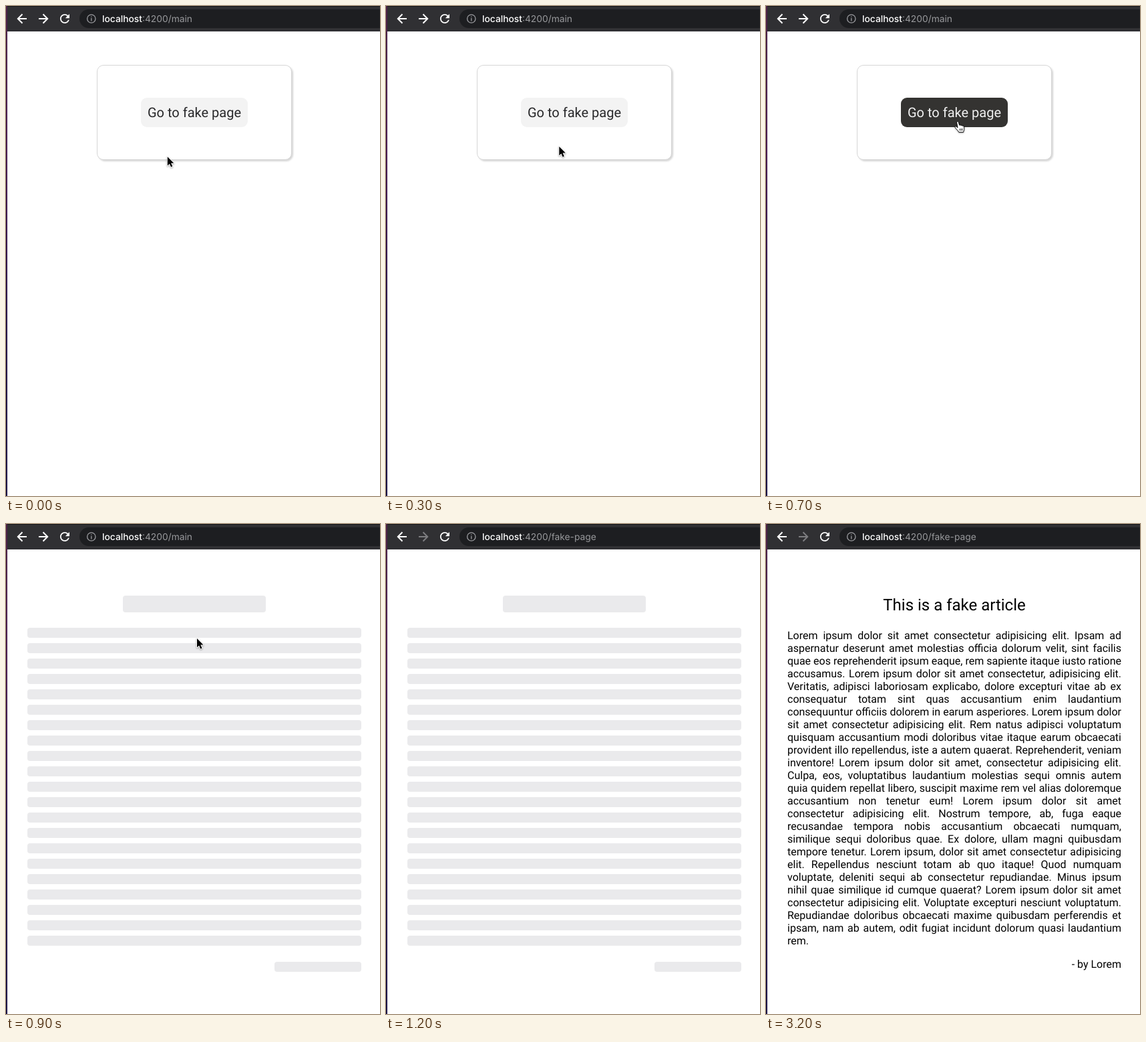
Animation of 560x732 px, one loop 3500 ms. Source, as an HTML page:

```html
<!DOCTYPE html>
<html lang="en">
<head>
<meta charset="utf-8">
<title>Skeleton loading</title>
<style>
  html, body { margin: 0; width: 100%; height: 100%; overflow: hidden; background: #fff; }
  svg { position: absolute; left: 0; top: 0; }
  svg, #article { font-family: Roboto, sans-serif; text-rendering: geometricPrecision; }
  #article { position: absolute; left: 32px; top: 0; width: 500px; color: #000; font-size: 16px; line-height: 19px; }
  #article > * { position: absolute; left: 0; width: 500px; margin: 0; font-weight: 400; }
  h1 { top: 107px; font-size: 24px; line-height: 28px; text-align: center; }
  /* tighter spaces keep every line on one row; justification widens them again */
  #body { top: 157px; white-space: pre-line; text-align: justify; text-align-last: justify; word-spacing: -1px; }
  #author { top: 648px; text-align: right; }
  .url { font: 500 13.8px Inter, sans-serif; }
  .icon { fill: none; stroke: #fff; stroke-width: 2; }
  #card { filter: drop-shadow(2px 2px 1px rgba(0, 0, 0, .16)); }
  #pointer { filter: drop-shadow(0 1px 1px rgba(0, 0, 0, .35)); }
</style>
</head>
<body>
<svg width="560" height="732" viewBox="0 0 560 732">
  <defs>
    <linearGradient id="desktop" x1="0" y1="0" x2="0" y2="1">
      <stop offset="0" stop-color="#4b2145"/>
      <stop offset=".3" stop-color="#481a50"/>
      <stop offset=".65" stop-color="#241048"/>
      <stop offset="1" stop-color="#1b0d45"/>
    </linearGradient>
  </defs>
  <rect width="560" height="732" fill="#fff"/>
  <rect width="2" height="732" fill="url(#desktop)"/>

  <rect x="2" width="558" height="38" fill="#303033"/>
  <rect x="2" width="558" height="1" fill="#151517"/>
  <rect x="110" y="5" width="480" height="28" rx="14" fill="#1d1e21"/>
  <path class="icon" d="M31 19H18M24.5 12.3L17.8 19L24.5 25.7"/>
  <path class="icon" id="forward" d="M49 19H62M55.5 12.3L62.2 19L55.5 25.7"/>
  <path fill="#fff" transform="translate(77.5 8.5) scale(.875)" d="M17.65 6.35C16.2 4.9 14.21 4 12 4c-4.42 0-7.99 3.58-7.99 8s3.57 8 7.99 8c3.73 0 6.84-2.55 7.73-6h-2.08c-.82 2.33-3.04 4-5.65 4-3.31 0-6-2.69-6-6s2.69-6 6-6c1.66 0 3.14.69 4.22 1.78L13 11h7V4z"/>
  <g fill="none" stroke="#9b9ca0" stroke-width="1.3">
    <circle cx="127.8" cy="19" r="6.2"/>
    <path d="M127.8 18V22.5M127.8 15.4V16.8"/>
  </g>
  <text class="url" x="144" y="24" fill="#fff">localhost<tspan id="path" fill="#98999c" font-weight="400"></tspan></text>

  <g id="card">
    <rect x="136.5" y="88.5" width="291" height="141" rx="9.5" fill="#fff" stroke="#d6d6d6"/>
  </g>
  <g id="button">
    <rect id="buttonBox" x="202" y="137" width="160" height="44" rx="9"/>
    <text id="buttonText" x="282" y="166" font-size="20" text-anchor="middle">Go to fake page</text>
  </g>

  <g id="skeleton" fill="#eaeaec"></g>

  <g id="pointer">
    <path id="arrow" d="M0 0V13.3L3.1 10.5L5.3 15.4L7.5 14.4L5.3 9.6H9.5Z" fill="#000" stroke="#fff" stroke-width="1.8" stroke-linejoin="round" paint-order="stroke"/>
    <g id="hand" transform="translate(-4 1)" stroke="#000" stroke-width=".9" stroke-linejoin="round">
      <path fill="#fff" d="M3.6 2C3.4 .2 5.8 0 6.3 1.6L7.6 6.2C8.3 5.4 9.6 5.6 9.9 6.6C10.7 5.9 11.9 6.2 12.1 7.2C13 6.7 14.1 7.2 14.3 8.2L14.8 11C15.1 13.3 13.8 14.5 13.6 16.6H6.8C6 14.4 3.2 12.4 1.3 9.8C.3 8.2 1.8 7.2 3.2 8.3L5 9.8Z"/>
      <path fill="none" stroke-width=".8" d="M8.2 11.2V14.3M10.2 11V14.3M12.1 11V14.3"/>
    </g>
  </g>
</svg>

<div id="article">
  <h1>This is a fake article</h1>
  <p id="body">Lorem ipsum dolor sit amet consectetur adipisicing elit. Ipsam ad
aspernatur deserunt amet molestias officia dolorum velit, sint facilis
quae eos reprehenderit ipsum eaque, rem sapiente itaque iusto ratione
accusamus. Lorem ipsum dolor sit amet consectetur, adipisicing elit.
Veritatis, adipisci laboriosam explicabo, dolore excepturi vitae ab ex
consequatur totam sint quas accusantium enim laudantium
consequuntur officiis dolorem in earum asperiores. Lorem ipsum dolor
sit amet consectetur adipisicing elit. Rem natus adipisci voluptatum
quisquam accusantium modi doloribus vitae itaque earum obcaecati
provident illo repellendus, iste a autem quaerat. Reprehenderit, veniam
inventore! Lorem ipsum dolor sit amet, consectetur adipisicing elit.
Culpa, eos, voluptatibus laudantium molestias sequi omnis autem
quia quidem repellat libero, suscipit maxime rem vel alias doloremque
accusantium non tenetur eum! Lorem ipsum dolor sit amet
consectetur adipisicing elit. Nostrum tempore, ab, fuga eaque
recusandae tempora nobis accusantium obcaecati numquam,
similique sequi doloribus quae. Ex dolore, ullam magni quibusdam
tempore tenetur. Lorem ipsum, dolor sit amet consectetur adipisicing
elit. Repellendus nesciunt totam ab quo itaque! Quod numquam
voluptate, deleniti sequi ab consectetur repudiandae. Minus ipsum
nihil quae similique id cumque quaerat? Lorem ipsum dolor sit amet
consectetur adipisicing elit. Voluptate excepturi nesciunt voluptatum.
Repudiandae doloribus obcaecati maxime quibusdam perferendis et
ipsam, nam ab autem, odit fugiat incidunt dolorum quasi laudantium
rem.</p>
  <p id="author">- by Lorem</p>
</div>

<script>
  const LOOP = 3500, STEP = 100;
  const byId = id => document.getElementById(id);
  const show = (id, visible) => { byId(id).style.display = visible ? '' : 'none'; };
  const blend = (from, to, k) => `rgb(${from.map((v, i) => Math.round(v + (to[i] - v) * k))})`;

  const LIGHT = [243, 243, 243], DARK = [52, 51, 49];
  const TEXT = [40, 40, 42], TEXT_HOVER = [240, 240, 240];

  // [start time, x, y, hover amount of the button]
  const pointerKeys = [
    [0, 241.8, 225.2, 0],
    [100, 242.2, 225.2, 0],
    [300, 259.3, 210, 0],
    [400, 273, 192, 0],
    [500, 282, 177, .25],
    [600, 286, 171, .75],
    [700, 286, 171, 1]
  ];

  const bar = (x, y, width, height) =>
    `<rect x="${x}" y="${y}" width="${width}" height="${height}" rx="4"/>`;
  byId('skeleton').innerHTML = bar(175, 107, 214, 25) + bar(402, 654, 130, 15) +
    Array.from({ length: 21 }, (_, i) => bar(32, 155 + 23 * i, 500, 15)).join('');

  function render(time) {
    const t = Math.floor(time % LOOP / STEP) * STEP;
    const onMain = t < 900, navigated = t >= 1000, loaded = t >= 2900;
    const [, x, y, hover] = pointerKeys.filter(key => key[0] <= t).pop();
    const overButton = onMain && hover > 0;

    show('card', onMain);
    show('button', onMain);
    show('skeleton', !onMain && !loaded);
    show('article', loaded);
    show('pointer', t < 1200);
    show('arrow', !overButton);
    show('hand', overButton);

    byId('path').textContent = navigated ? ':4200/fake-page' : ':4200/main';
    byId('forward').style.stroke = navigated ? '#7d7d80' : '#fff';
    byId('pointer').setAttribute('transform', `translate(${x} ${y})`);
    byId('buttonBox').setAttribute('fill', blend(LIGHT, DARK, hover));
    byId('buttonText').setAttribute('fill', blend(TEXT, TEXT_HOVER, hover));
  }

  const start = performance.now();
  function frame() {
    render(performance.now() - start);
    requestAnimationFrame(frame);
  }
  frame();
</script>
</body>
</html>
```
